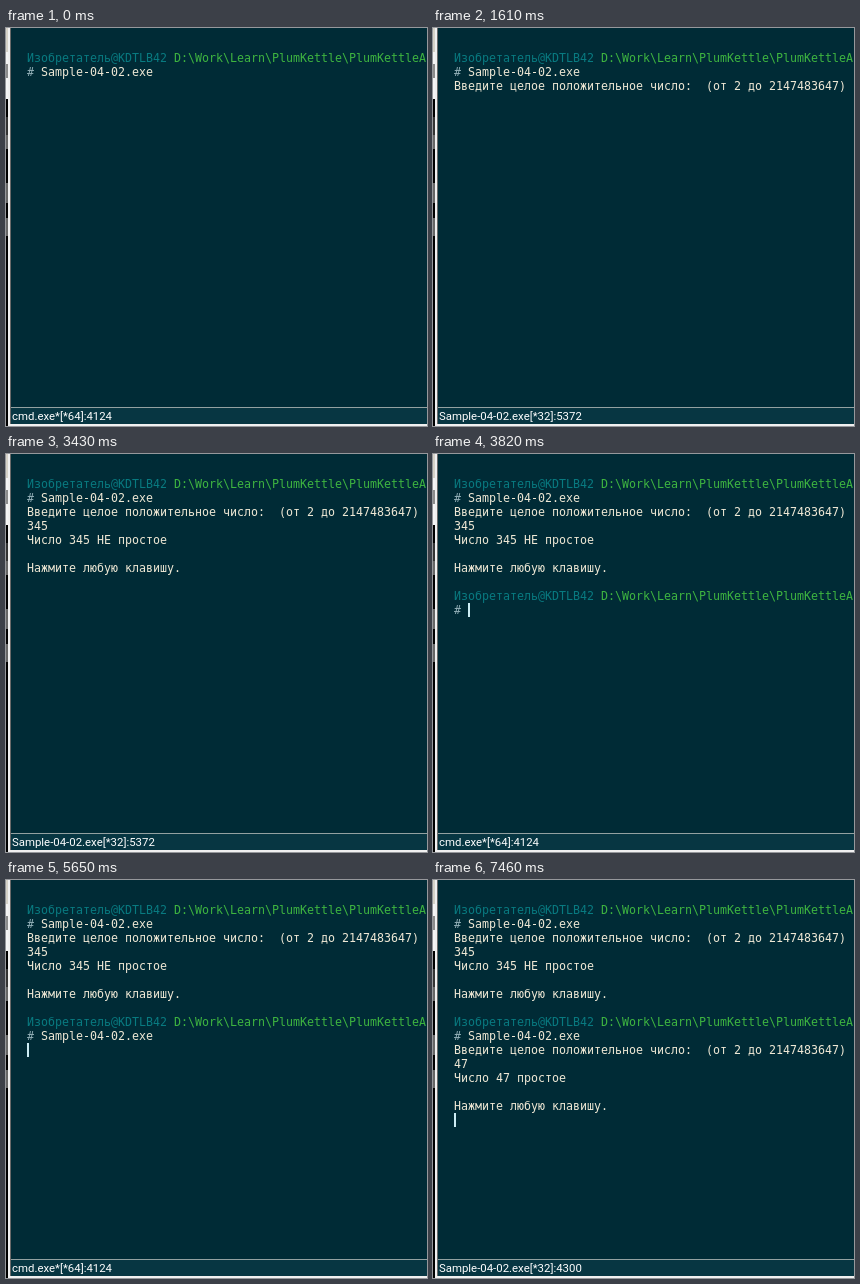
Recreate the animation shown at these times as an HTML page. Size 421 by 398 pixels, loop 7990 ms.

```html
<!DOCTYPE html>
<html lang="ru">
<head>
<meta charset="utf-8">
<style>
  html, body { margin: 0; width: 100%; height: 100%; overflow: hidden; background: #002b36; }
  #stage { position: relative; width: 421px; height: 398px; overflow: hidden; }
  #stage > * { position: absolute; margin: 0; }
  #edge {
    left: 0; top: 0; width: 2px; height: 398px;
    background: linear-gradient(#d6d2c8 24px, #f4f4f4 0 36px, #8c8c8c 0 50px, #f4f4f4 0 71px,
      #000 0 89px, #333 0 107px, #666 0 121px, #000 0 155px, #666 0 175px, #000 0 190px, #666 0 208px, #000 0);
  }
  #frame { left: 2px; top: 0; width: 3px; height: 398px; background: linear-gradient(90deg, #f0f0f0 2px, #696969 0); }
  #base { left: 2px; top: 396px; width: 419px; height: 2px; background: #f0f0f0; }
  #screen {
    left: 21px; top: 23px; white-space: pre; color: #eee8d5;
    font: 11.63px/14px "DejaVu Sans Mono", monospace;
  }
  .user { color: #087a80; }
  .path { color: #3eb540; }
  .mark { color: #93b0b8; }
  #cursor { width: 2px; height: 14px; background: #ccedf4; }
  #status {
    left: 5px; top: 379px; width: 415px; height: 16px; padding-left: 1px;
    background: #073642; border-top: 1px solid #93a1a1; color: #fff; white-space: pre;
    font: 11.4px/16px Roboto, sans-serif;
  }
</style>
</head>
<body>
<div id="stage">
  <div id="edge"></div>
  <pre id="screen"></pre>
  <div id="cursor"></div>
  <div id="status"></div>
  <div id="frame"></div>
  <div id="base"></div>
</div>
<script>
const LOOP = 7990, CELL = 7, LINE = 14, LEFT = 21, TOP = 23;
const user = "Изобретатель@KDTLB42";
const path = "D:\\Work\\Learn\\PlumKettle\\PlumKettleA";
const program = "Sample-04-02.exe";
const prompt = `${user} ${path}\n# `;
const question = "Введите целое положительное число:  (от 2 до 2147483647)\n";
const answer = text => `Число ${text}\n\nНажмите любую клавишу.\n`;
const shell = "cmd.exe*[*64]:4124";
const running = id => `${program}[*32]:${id}`;

// Each step: time, text appended to the terminal, cursor visible, new status.
const steps = [
  [0, prompt + program, false, shell],
  [60, "", true],
  [620, "", false],
  [990, "\n", true],
  [1080, question, true],
  [1330, "", true, running(5372)],
  [1610, "", false],
  [2040, "34", true],
  [2130, "5", true],
  [2660, "", false],
  [2900, "\n" + answer("345 НЕ простое"), true],
  [3430, "", false],
  [3640, "\n" + prompt, true],
  [3820, "", true, shell],
  [4190, "", false],
  [4730, "", true],
  [5010, program, true],
  [5560, "", false],
  [5650, "\n", true],
  [5740, question, true],
  [5830, "", true, running(4300)],
  [6300, "", false],
  [6830, "", true],
  [6920, "4", true],
  [7130, "7", true],
  [7430, "\n", true],
  [7460, answer("47 простое"), true]
];

const [screenEl, cursorEl, statusEl] = ["screen", "cursor", "status"].map(id => document.getElementById(id));
const span = (name, text) => `<span class="${name}">${text}</span>`;

function colour(line) {
  if (line.startsWith(user)) return span("user", user) + " " + span("path", path);
  if (line.startsWith("#")) return span("mark", "#") + line.slice(1);
  return line;
}

function show(count) {
  const past = steps.slice(0, count);
  const lines = past.map(step => step[1]).join("").split("\n");
  const row = lines.length - 1;
  screenEl.innerHTML = lines.map(colour).join("\n");
  cursorEl.style.left = LEFT + lines[row].length * CELL + "px";
  cursorEl.style.top = TOP + row * LINE + "px";
  cursorEl.hidden = !past[count - 1][2];
  statusEl.textContent = past.filter(step => step[3]).pop()[3];
}

let shown = 0;
const start = performance.now();
function tick() {
  const time = (performance.now() - start) % LOOP;
  const count = steps.filter(step => step[0] <= time).length;
  if (count !== shown) show(shown = count);
  requestAnimationFrame(tick);
}
tick();
</script>
</body>
</html>
```
